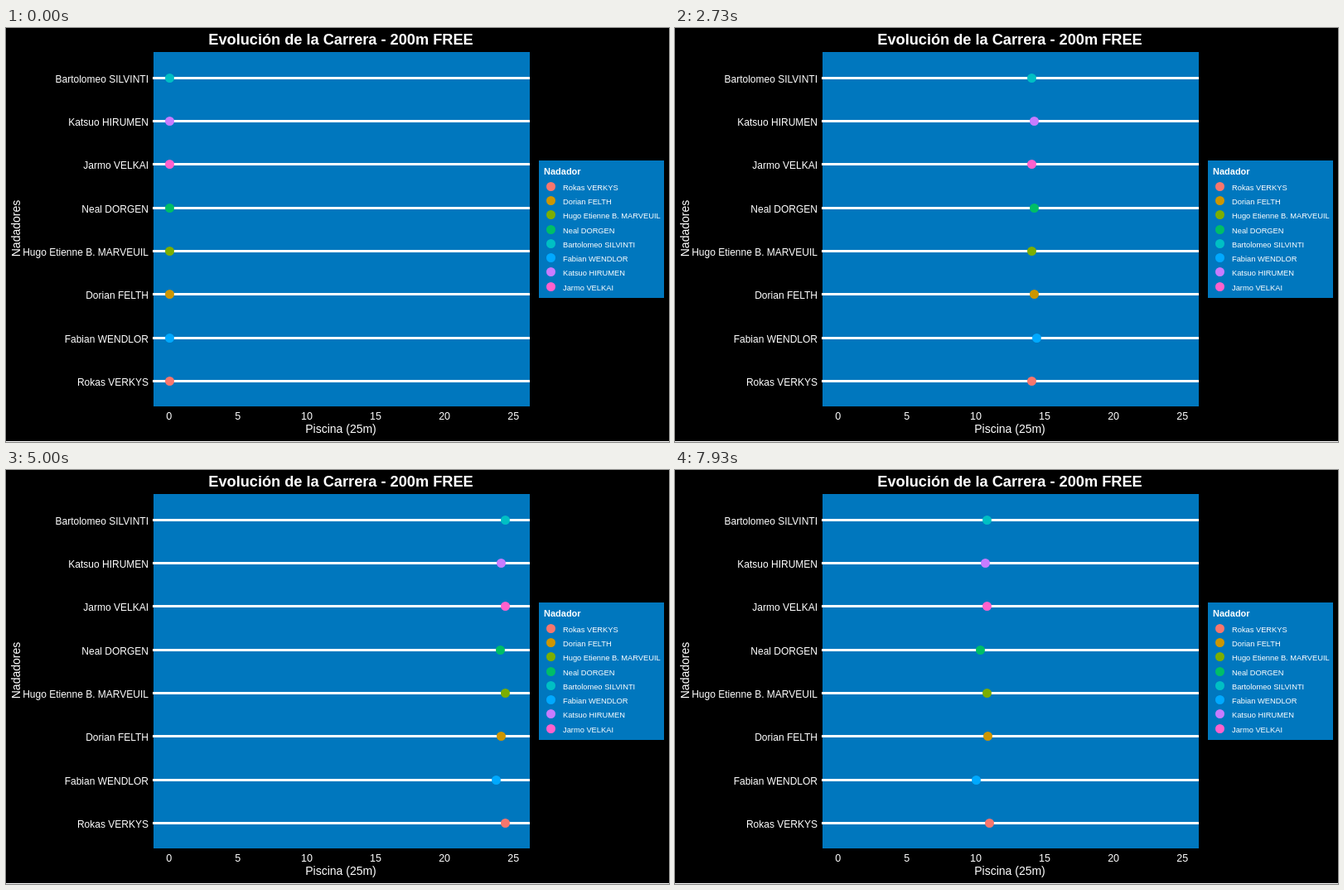
An HTML page that plays this animation: 800x500 px, repeating every 8000 ms.

```html
<!DOCTYPE html>
<html lang="es">
<head>
<meta charset="utf-8">
<style>
  html, body { margin: 0; width: 100%; height: 100%; overflow: hidden; background: #000; }
  svg { display: block; width: 800px; height: 500px; font-family: "Liberation Sans", Arial, sans-serif; }
  text { fill: #fff; }
</style>
</head>
<body>
<svg id="stage" viewBox="0 0 800 500"></svg>
<script>
const LOOP = 8000;
const START_X = 196.8, POOL_WIDTH = 415;
const WATER = '#0077be';
const stage = document.getElementById('stage');

// Lanes from top to bottom: turn is the step at the wall, back the pixels per step afterwards.
const swimmers = [
  { name: 'Bartolomeo SILVINTI', color: '#00bfc4', turn: 73, back: 5.126, key: 4 },
  { name: 'Katsuo HIRUMEN', color: '#c77cff', turn: 72, back: 5.06, key: 6 },
  { name: 'Jarmo VELKAI', color: '#ff61cc', turn: 73, back: 5.126, key: 7 },
  { name: 'Neal DORGEN', color: '#00be67', turn: 72, back: 5.187, key: 3 },
  { name: 'Hugo Etienne B. MARVEUIL', color: '#7cae00', turn: 73, back: 5.126, key: 2 },
  { name: 'Dorian FELTH', color: '#cd9600', turn: 72, back: 4.996, key: 1 },
  { name: 'Fabian WENDLOR', color: '#00a9ff', turn: 71, back: 5.184, key: 5 },
  { name: 'Rokas VERKYS', color: '#f8766d', turn: 73, back: 5.064, key: 0 }
];

function add(tag, attributes, content = '') {
  const node = document.createElementNS('http://www.w3.org/2000/svg', tag);
  for (const [key, value] of Object.entries(attributes)) node.setAttribute(key, value);
  node.textContent = content;
  return stage.appendChild(node);
}

const rect = (x, y, width, height, fill) => add('rect', { x, y, width, height, fill });
const dot = (x, y, fill) => add('circle', { cx: x + 0.5, cy: y + 0.5, r: 5.5, fill });
const label = (content, x, y, size, anchor = 'start', extra = {}) =>
  add('text', { x, y, 'font-size': size, 'text-anchor': anchor, ...extra }, content);

rect(178, 29, 454, 428, WATER);
rect(643, 160, 151, 166, WATER);
rect(0, 499, 800, 1, '#fff');

label('Evolución de la Carrera - 200m FREE', 404, 20, 18.2, 'middle', { 'font-weight': 'bold' });
label('Piscina (25m)', 404, 489, 14, 'middle');
label('Nadadores', 0, 0, 14, 'middle', { transform: 'translate(17 242) rotate(-90)' });
label('Nadador', 649, 177, 11, 'start', { 'font-weight': 'bold' });

for (let metres = 0; metres <= 25; metres += 5) {
  label(metres, 196.7 + metres * 16.62, 473, 12.5, 'middle');
}

swimmers.forEach((swimmer, lane) => {
  const y = Math.round(59.9 + lane * 366 / 7);
  rect(177, y - 1, 455, 3, '#fff');
  label(swimmer.name, 172, y + 6, 12, 'end');

  const keyY = Math.round(190.8 + swimmer.key * 17.28);
  dot(657, keyY, swimmer.color);
  label(swimmer.name, 672, keyY + 5, 9.3);

  swimmer.dot = dot(START_X, y, swimmer.color);
});

function position({ turn, back }, step) {
  const x = step <= turn
    ? START_X + POOL_WIDTH * step / turn
    : START_X + POOL_WIDTH - back * (step - turn);
  return Math.round(x);
}

function draw(now) {
  // 15 steps per second, each starting on a whole hundredth of a second.
  const hundredths = Math.floor((now % LOOP) / 10);
  const step = Math.floor((hundredths + 0.5) * 3 / 20);
  for (const swimmer of swimmers) {
    swimmer.dot.setAttribute('cx', position(swimmer, step) + 0.5);
  }
}

let startTime;
function tick(now) {
  startTime ??= now;
  draw(now - startTime);
  requestAnimationFrame(tick);
}

draw(0);
requestAnimationFrame(tick);
</script>
</body>
</html>
```
